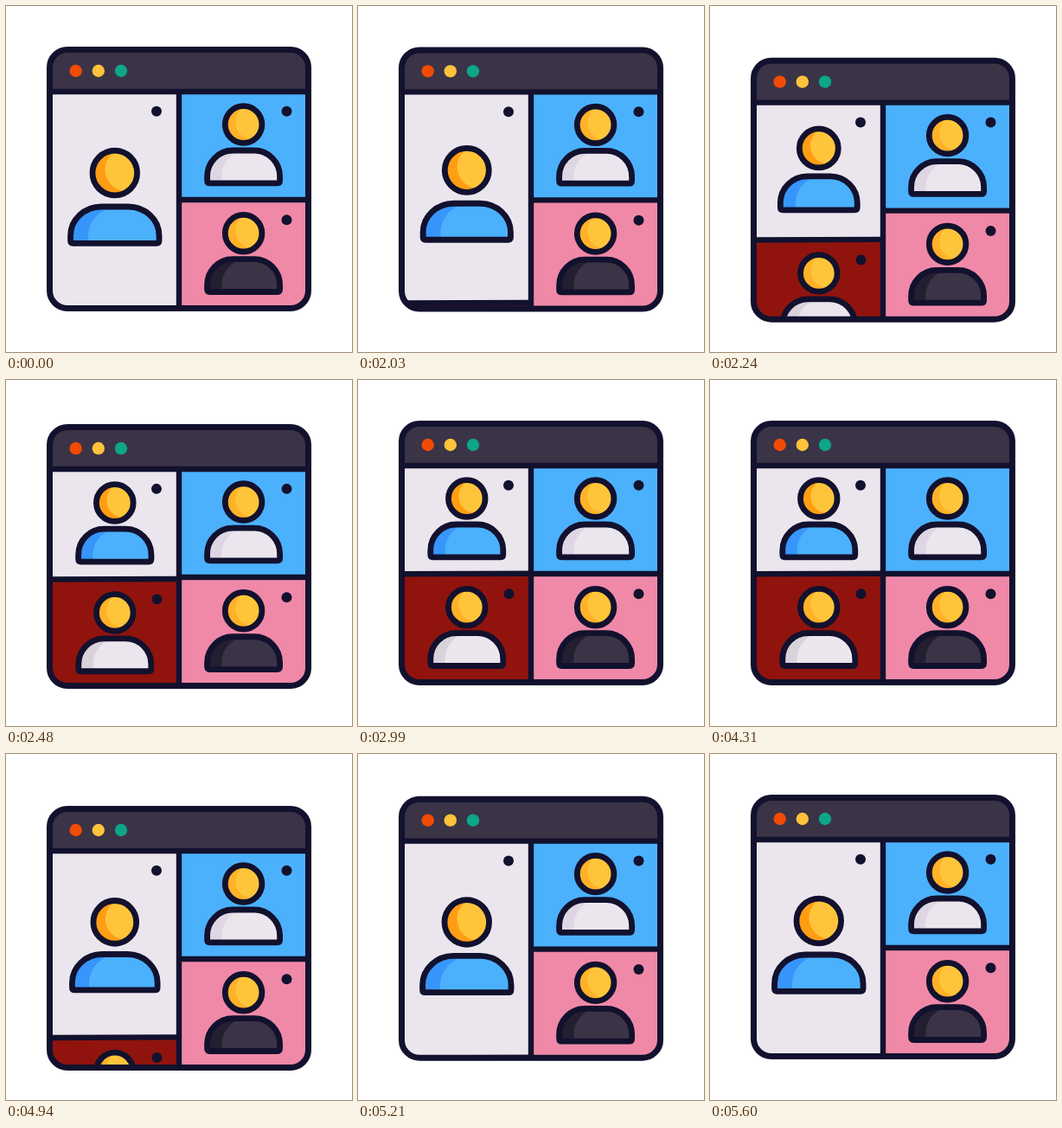
Recreate the animation shown at these times as an HTML page. Size 400 by 400 pixels, loop 5.63 s.

```html
<!DOCTYPE html>
<html lang="en">
<head>
<meta charset="utf-8">
<title>Video call</title>
<style>
html, body { margin: 0; width: 100%; height: 100%; overflow: hidden; background: #fff; }
svg { display: block; width: 100vw; height: 100vh; }
.ink { fill: none; stroke: #12112e; stroke-width: 6.4; stroke-linejoin: round; }
.body, .head { stroke-width: 6.8; }
.border { stroke-width: 7; }
.dot { fill: #12112e; }
</style>
</head>
<body>
<svg viewBox="0 0 400 400">
  <defs>
    <clipPath id="frame"><rect x="50.5" y="50.5" width="299" height="299" rx="20.5"/></clipPath>
  </defs>
  <g id="win">
    <g clip-path="url(#frame)">
      <rect x="50" y="99" width="150" height="251" fill="#ebe6ee"/>
      <rect x="200" y="99" width="150" height="125" fill="#4bb1fc"/>
      <rect x="200" y="224" width="150" height="126" fill="#f089a8"/>
      <g id="left"></g>
      <g id="right"></g>
      <g id="guest">
        <path d="M50 224.3L200 223.7V352H50Z" fill="#90140d"/>
        <path class="ink" d="M50 224.3L200 223.7"/>
        <circle class="dot" cx="174.5" cy="247.3" r="6"/>
      </g>
      <circle class="dot" cx="174" cy="121.8" r="6"/>
      <circle class="dot" id="blink" cx="324.5" cy="121.8" r="6"/>
      <circle class="dot" cx="324.5" cy="247.3" r="6"/>
      <rect x="50" y="50" width="300" height="49" fill="#3b3346"/>
      <path class="ink" d="M50 99H350M200 99V350M200 224H350"/>
    </g>
    <circle cx="80.7" cy="75" r="7.2" fill="#f24b03"/>
    <circle cx="106.8" cy="75" r="7.2" fill="#fec33b"/>
    <circle cx="133" cy="75" r="7.2" fill="#0da688"/>
    <rect class="ink border" x="50.5" y="50.5" width="299" height="299" rx="20.5"/>
  </g>
</svg>
<script>
const LOOP = 5630, JOIN = 2000, LEAVE = 4670, SLIDE = 590;
const $ = id => document.getElementById(id);
const clamp = x => Math.min(1, Math.max(0, x));
const mix = (a, b, p) => a + (b - a) * p;
const wave = x => (1 - Math.cos(Math.PI * clamp(x))) / 2;

function bezier(x1, y1, x2, y2) {
  const at = (a, b, u) => 3 * a * u * (1 - u) ** 2 + 3 * b * u * u * (1 - u) + u ** 3;
  return x => {
    if (x <= 0) return 0;
    if (x >= 1) return 1;
    let lo = 0, hi = 1;
    for (let i = 0; i < 24; i++) {
      const mid = (lo + hi) / 2;
      if (at(x1, x2, mid) < x) lo = mid; else hi = mid;
    }
    return at(y1, y2, lo);
  };
}
const ease = bezier(0.25, 0.25, 0.25, 1);
const settle = bezier(0.4, 0, 0.4, 1);

function add(parent, tag, attrs) {
  const el = document.createElementNS("http://www.w3.org/2000/svg", tag);
  set(el, attrs);
  return parent.appendChild(el);
}
function set(el, attrs) {
  for (const k in attrs) el.setAttribute(k, attrs[k]);
}

function bodyPath(cx, top, w, h) {
  const l = cx - w / 2, r = cx + w / 2, b = top + h;
  const rx = w * 0.35, ry = h * 0.79, kx = rx * 0.45, ky = ry * 0.45;
  return `M${l} ${b - 3}V${top + ry}C${l} ${top + ky} ${l + kx} ${top} ${l + rx} ${top}` +
    `H${r - rx}C${r - kx} ${top} ${r} ${top + ky} ${r} ${top + ry}` +
    `V${b - 3}Q${r} ${b} ${r - 3} ${b}H${l + 3}Q${l} ${b} ${l} ${b - 3}Z`;
}

// Builds a figure and returns a function that poses it.
let count = 0;
function person(parent, cx, colors) {
  const [skin, skinShade, cloth, clothShade] = colors;
  const id = "clip" + count++;
  const headClip = add(add(parent, "clipPath", { id: id + "h" }), "circle", {});
  const bodyClip = add(add(parent, "clipPath", { id: id + "b" }), "path", {});
  const bodyBack = add(parent, "path", { fill: clothShade });
  const bodyLight = add(add(parent, "g", { "clip-path": `url(#${id}b)` }), "path", { fill: cloth });
  const bodyLine = add(parent, "path", { class: "ink body" });
  const headBack = add(parent, "circle", { fill: skinShade });
  const headLight = add(add(parent, "g", { "clip-path": `url(#${id}h)` }), "ellipse", { fill: skin });
  const headLine = add(parent, "circle", { class: "ink head" });
  return (cy, r, top, w, h) => {
    const d = bodyPath(cx, top, w, h);
    for (const el of [bodyClip, bodyBack, bodyLine]) set(el, { d });
    set(bodyLight, { d: bodyPath(cx + w * 0.2, top, w, h) });
    for (const el of [headClip, headBack, headLine]) set(el, { cx, cy, r });
    set(headLight, { cx: cx + r * 0.56, cy: cy - r * 0.14, rx: r, ry: r * 0.97 });
  };
}

const host = person($("left"), 125.8, ["#ffc53a", "#ff9d14", "#4bb1fc", "#3795fb"]);
const small = (parent, cx, dy, cloth, shade) =>
  person(parent, cx, ["#ffc53a", "#ffb128", cloth, shade])(137 + dy, 21.3, 167 + dy, 84, 37.8);
small($("right"), 274.6, 0, "#ebe6ee", "#dfd6e3");
small($("right"), 274.6, 125.7, "#3b3346", "#241f30");
small($("guest"), 125.8, 125.7, "#ebe6ee", "#d9d2da");

function dip(t) {
  return t < 270 ? 13 * wave(t / 270) : 13 * (1 - settle((t - 270) / 400));
}
function nudge(t) {
  return t > 0 && t < 1 ? 3 * Math.sin(Math.PI * t) ** 2 : 0;
}

function draw(t) {
  const drop = dip(t - JOIN) + dip(t - LEAVE) + nudge((t - 3710) / 450);
  const join = ease((t - JOIN) / SLIDE);
  const p = join - ease((t - LEAVE) / SLIDE);
  const q = join - ease((t - LEAVE - 40) / SLIDE);
  host(mix(193, 137, p), mix(25.8, 21.3, p), mix(232, 167, p), mix(102.5, 84, p), mix(42.3, 37.8, p));
  set($("guest"), {
    transform: `translate(0 ${127 * (1 - q)})`,
    visibility: q > 0.001 ? "visible" : "hidden"
  });
  set($("win"), { transform: `translate(0 ${drop})` });
  const off = (t >= 4310 && t < 4340) || (t >= 4490 && t < 4520);
  set($("blink"), { visibility: off ? "hidden" : "visible" });
}

const start = performance.now();
function tick() {
  draw((performance.now() - start) % LOOP);
  requestAnimationFrame(tick);
}
tick();
</script>
</body>
</html>
```
